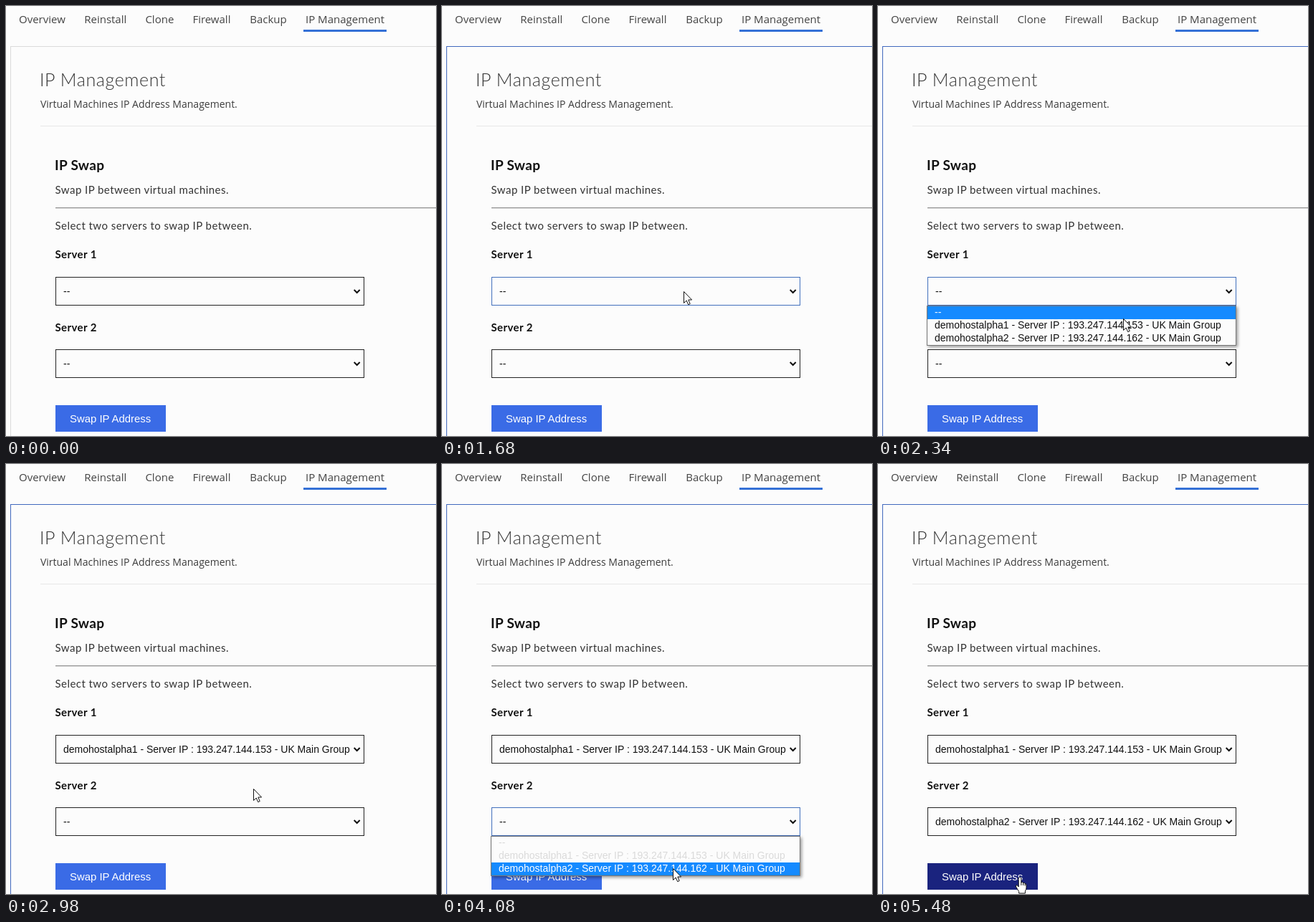
Animation, 600 px wide and 600 px high, one loop 5500 ms. Source, as an HTML page:

```html
<!DOCTYPE html>
<html lang="en">
<head>
<meta charset="utf-8">
<title>IP Management</title>
<style>
  html, body { margin: 0; width: 100%; height: 100%; overflow: hidden; background: #fcfcfc; }
  svg { display: block; width: 100vw; height: 100vh; }
  text { white-space: pre; }
  .nav { font: 15px "Open Sans", sans-serif; fill: #444; }
  .sub { font: 14px "Open Sans", sans-serif; fill: #3c3c3c; }
  .title { font: 300 25px Lato, sans-serif; letter-spacing: .6px; fill: #333; }
  .head { font: 700 19px Lato, sans-serif; letter-spacing: .3px; fill: #111; }
  .body { font: 15px Lato, sans-serif; letter-spacing: .45px; fill: #333; }
  .label { font: 700 15px Lato, sans-serif; letter-spacing: .4px; fill: #111; }
  .ui { font: 14px "Liberation Sans", Arial, sans-serif; fill: #111; }
  .btn { font: 14.9px "Liberation Sans", Arial, sans-serif; fill: #fff; }
</style>
</head>
<body>
<svg id="stage" viewBox="0 0 600 600">
  <defs>
    <filter id="shadow" x="-5%" y="-20%" width="112%" height="150%">
      <feDropShadow dx="2" dy="2" stdDeviation="2" flood-color="#000" flood-opacity=".4"/>
    </filter>
  </defs>
  <rect width="600" height="600" fill="#fcfcfc"/>
  <g id="page"></g>
  <g id="fields"></g>
  <g id="menus"></g>
  <path id="arrow" d="M.5 .5V16.5L4.2 13L6.7 18.7L9.2 17.6L6.8 12H11.6Z" fill="#fff" stroke="#111"/>
  <g id="hand" fill="#fff" stroke="#111" stroke-linejoin="round">
    <path d="M-1.8 1.6Q0 -.8 1.8 1.6V8Q3.6 6.6 4.6 8.6Q6.4 7.6 7.1 9.6Q8.8 9.2 9 11.2V15Q9 18 7.4 20V23H-1.4V20.6L-5.4 14Q-6 11.2 -4 11.6L-1.8 14Z"/>
    <path d="M1.8 8V12M4.6 8.6V12M7.1 9.6V12.5" fill="none"/>
  </g>
</svg>
<script>
const LOOP = 5500;
const SERVERS = [
  "demohostalpha1 - Server IP : 193.247.144.153 - UK Main Group",
  "demohostalpha2 - Server IP : 193.247.144.162 - UK Main Group"
];
const OPTIONS = ["--", ...SERVERS];
const BLUE = "#4270bd", INK = "#222";

const $ = id => document.getElementById(id);

function add(parent, tag, attrs, content) {
  const el = document.createElementNS("http://www.w3.org/2000/svg", tag);
  for (const key in attrs) el.setAttribute(key, attrs[key]);
  if (content) el.textContent = content;
  return parent.appendChild(el);
}

const label = (parent, cls, x, y, content) => add(parent, "text", { class: cls, x, y }, content);
const box = (parent, x, y, width, height, fill, more) =>
  add(parent, "rect", { x, y, width, height, fill, ...more });
const show = (el, on) => el.setAttribute("visibility", on ? "visible" : "hidden");

const page = $("page");
const tabs = [["Overview", 18], ["Reinstall", 109.2], ["Clone", 194.4],
  ["Firewall", 260.4], ["Backup", 340.2], ["IP Management", 418]];
tabs.forEach(([name, x]) => label(page, "nav", x, 24, name));
box(page, 415, 33, 116, 3, "#3470d6");
const panel = box(page, 6.5, 56.5, 640, 600, "none");
label(page, "title", 47, 112, "IP Management");
label(page, "sub", 48, 142, "Virtual Machines IP Address Management.");
box(page, 48, 167, 552, 1, "#e8e8e8");
label(page, "head", 68, 229, "IP Swap");
label(page, "body", 68.5, 262, "Swap IP between virtual machines.");
box(page, 69, 281, 531, 1, "#8f8f8f");
box(page, 69, 282, 531, 1, "#dedede");
label(page, "body", 68.5, 312, "Select two servers to swap IP between.");
label(page, "label", 68.5, 352, "Server 1");
label(page, "label", 68.5, 454, "Server 2");
const button = box(page, 69, 557, 154, 37, "#3a6be6");
label(page, "btn", 89, 581, "Swap IP Address");

function makeField(y) {
  const g = $("fields");
  const frame = box(g, 69.5, y + .5, 430, 39, "#fcfcfc");
  const value = label(g, "ui", 80, y + 25, "--");
  add(g, "path", { d: `M485.7 ${y + 18}l4 4l4 -4`, fill: "none", stroke: "#111", "stroke-width": 2 });
  return { frame, value };
}

function makeMenu(y) {
  const g = add($("menus"), "g", {});
  box(g, 68.5, y + .5, 431, 55, "#fcfcfc", { stroke: "#777", filter: "url(#shadow)" });
  const mark = box(g, 69, y + 1, 430, 18, "#158aff");
  const rows = OPTIONS.map((name, i) => label(g, "ui", 79, y + 14 + i * 18, name));
  return { g, y, mark, rows };
}

const fields = [makeField(378), makeField(479)];
const menus = [makeMenu(418), makeMenu(519)];

// Pointer stops: time, x, y
const STOPS = [
  [1080, 598, 300], [1640, 337, 398], [1960, 337, 398], [2340, 342, 436],
  [2600, 345, 446], [2900, 345, 446], [3260, 345, 503], [3560, 345, 503],
  [4000, 322, 564], [4460, 322, 564], [5000, 198, 576]
];

function pointer(t) {
  const i = STOPS.findIndex(s => s[0] > t);
  if (i === 0) return [700, 300];
  if (i < 0) return STOPS[STOPS.length - 1].slice(1);
  const [a, x0, y0] = STOPS[i - 1], [b, x1, y1] = STOPS[i];
  const k = (t - a) / (b - a), e = k * k * (3 - 2 * k);
  return [x0 + (x1 - x0) * e, y0 + (y1 - y0) * e];
}

function mix(from, to, k) {
  return `rgb(${from.map((c, i) => Math.round(c + (to[i] - c) * k))})`;
}

function setMenu(menu, open, active, disabled) {
  show(menu.g, open);
  const off = disabled.includes(active);
  menu.mark.setAttribute("y", menu.y + 1 + active * 18);
  menu.mark.setAttribute("fill", off ? "#c4c4c4" : "#158aff");
  menu.rows.forEach((row, i) => {
    const idle = disabled.includes(i) ? "#dadada" : "#111";
    row.style.fill = i !== active ? idle : off ? "#999" : "#fff";
  });
}

function setField(field, value, lit) {
  field.frame.setAttribute("stroke", lit ? BLUE : INK);
  field.value.textContent = value;
}

function draw(t) {
  const [x, y] = pointer(t);
  const picked1 = t >= 2900, picked2 = t >= 4240;
  panel.setAttribute("stroke", t >= 1080 ? "#4169be" : "#dadada");
  setField(fields[0], picked1 ? SERVERS[0] : "--", t >= 1280 && !picked1);
  setField(fields[1], picked2 ? SERVERS[1] : "--", t >= 3120 && !picked2);
  setMenu(menus[0], t >= 1960 && !picked1, y >= 437 ? 1 : 0, []);
  setMenu(menus[1], t >= 3400 && !picked2, y >= 556 ? 2 : 0, [0, 1]);

  const hover = Math.min(1, Math.max(0, (t - 4860) / 200));
  button.setAttribute("fill", mix([58, 107, 230], [26, 35, 126], hover));
  const over = t > 4460 && x < 223;
  show($("arrow"), t >= 1080 && !over);
  show($("hand"), over);
  const place = `translate(${Math.round(x)} ${Math.round(y)})`;
  $("arrow").setAttribute("transform", place);
  $("hand").setAttribute("transform", place);
}

const start = performance.now();
function tick() {
  draw((performance.now() - start) % LOOP);
  requestAnimationFrame(tick);
}
tick();
</script>
</body>
</html>
```
